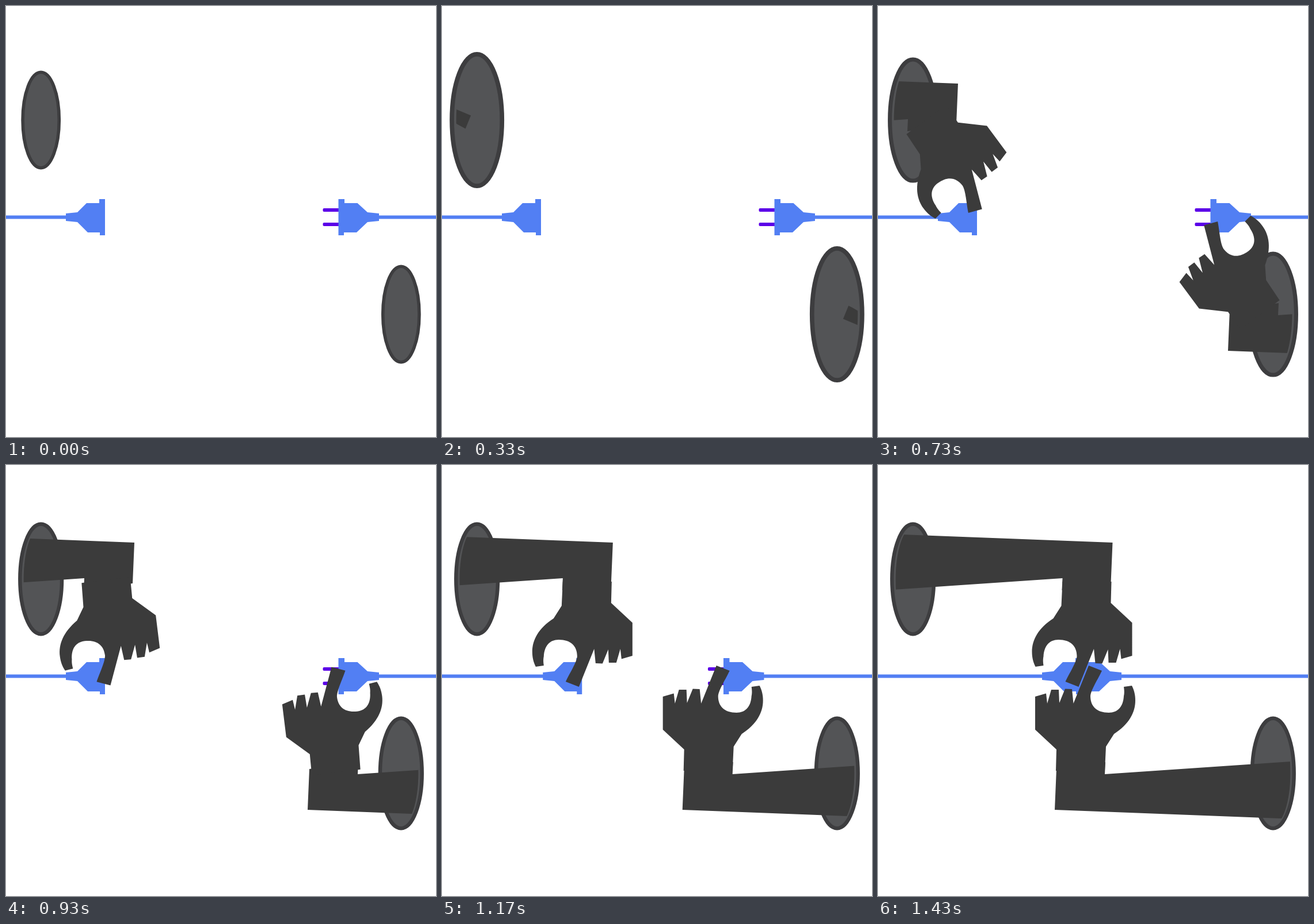
Write an HTML page with a canvas that moves like this. It is 747 by 750 pixels and loops after 2010 ms.

```html
<!DOCTYPE html>
<html lang="en">
<head>
<meta charset="utf-8">
<title>Plugging in</title>
<style>
html, body { margin: 0; width: 100%; height: 100%; overflow: hidden; background: #fff; }
canvas { display: block; }
</style>
</head>
<body>
<canvas id="stage" width="747" height="750"></canvas>
<script>
const ctx = document.getElementById('stage').getContext('2d');
const W = 747, H = 750, LOOP = 2010, TAU = Math.PI * 2;
const DARK = '#3b3b3b', RIM = '#3d3d3f', HOLE = '#535456', BLUE = '#527ff3', PRONG = '#5b00e8';
const CX = 60.7, CY = 198.5;

const socket = new Path2D('M-300 364.5H104V361L124 359 140 343H162V336H172V399H163V394H142L124 376 104 374V370.5H-300Z');
const plug = new Path2D('M1050 364.5H648V361L628 359 610.5 343H588V336H577.5V399H587V394H609L628 376 648 374V370.5H1050Z');
const hand = new Path2D(
  'M210 203L208 245 194 267C168 284 157 304 157 325C157 335 159 343 163 351' +
  'L177 349C176 342 176 338 177 333C178 315 187 304 203 304C224 304 235 315 235 333' +
  'C234 344 222 362 215 377L238 386 264.5 320 267 345 279 345.5 289 321 290 344 303 344' +
  ' 310 320 312 337.5 331 332V274.5L294 240 295 203Z');
const arm = new Path2D('M0 0L-3 71-88 83-87 62-600 97-600-23Z');

// step, wrist x, wrist y, wrist angle, elbow x
const reach = [
  [4, -210, 170, -97, -200],
  [10, -114.3, 187.7, -89, -92],
  [16, -19.1, 208, -69, 18],
  [22, 82.9, 221.2, -36.5, 139],
  [28, 161.4, 220.2, -7, 223],
  [30, 166, 221.5, 0, 225]
];

const unit = (n, a, b) => Math.min(1, Math.max(0, (n - a) / (b - a)));
const wave = u => (1 - Math.cos(Math.PI * u)) / 2;
const smooth = u => u * u * (3 - 2 * u);

function slope(i, c) {
  const a = reach[i - 1], b = reach[i + 1];
  return a && b ? (b[c] - a[c]) / (b[0] - a[0]) : 0;
}

// cubic through the reach table, column c
function pose(n, c) {
  const last = reach.length - 1;
  if (n <= reach[0][0]) return reach[0][c];
  if (n >= reach[last][0]) return reach[last][c];
  const i = reach.findIndex(r => r[0] > n) - 1;
  const a = reach[i], b = reach[i + 1], d = b[0] - a[0], u = (n - a[0]) / d;
  return a[c] + (b[c] - a[c]) * smooth(u) +
    d * u * (1 - u) * ((slope(i, c) - (b[c] - a[c]) / d) * (1 - u) -
      (slope(i + 1, c) - (b[c] - a[c]) / d) * u) +
    (b[c] - a[c]) * u * (1 - u) * (1 - 2 * u);
}

function fillAt(path, color, x, y = 0) {
  ctx.save();
  ctx.translate(x, y);
  ctx.fillStyle = color;
  ctx.fill(path);
  ctx.restore();
}

function drawHole(ry) {
  const line = ry * 0.065;
  ctx.beginPath();
  ctx.ellipse(CX, CY, ry * 0.4 - line / 2, ry - line / 2, 0, 0, TAU);
  ctx.fillStyle = HOLE;
  ctx.fill();
  ctx.lineWidth = line;
  ctx.strokeStyle = RIM;
  ctx.stroke();
}

// hides whatever is still behind the left wall of the hole
function clipHole(ry) {
  const rx = ry * 0.4 * 0.76, q = Math.PI / 2;
  ctx.beginPath();
  ctx.moveTo(CX, -50);
  ctx.ellipse(CX, CY, rx, ry * 0.91, 0, -q, -2 * q, true);
  ctx.ellipse(CX, CY, rx, ry * 1.21, 0, 2 * q, q, true);
  ctx.lineTo(CX, 900);
  ctx.lineTo(900, 900);
  ctx.lineTo(900, -50);
  ctx.closePath();
  ctx.clip();
}

function drawArm(n, ry, shift) {
  ctx.save();
  drawHole(ry);
  clipHole(ry);
  fillAt(arm, DARK, pose(n, 4) + shift, 135);
  ctx.translate(pose(n, 1) + shift, pose(n, 2));
  ctx.rotate(pose(n, 3) * Math.PI / 180);
  fillAt(hand, DARK, -238, -221.5);
  ctx.restore();
}

function drawProngs(x) {
  ctx.fillStyle = PRONG;
  for (const y of [352, 377]) {
    ctx.beginPath();
    ctx.roundRect(550.5 + x, y, 30, 6, 2);
    ctx.fill();
  }
}

function draw(t) {
  const n = Math.floor(t * 0.03 + 0.1001);   // thirty steps a second
  const ry = 86 + 40.5 * wave(unit(n, 4, 12.5)) - 27.5 * wave(unit(n, 13.5, 28));
  const pull = smooth(unit(n, 29, 43));
  const lead = 32.5 * smooth(unit(n, 28, 35));   // the right hand reaches further

  ctx.fillStyle = '#fff';
  ctx.fillRect(0, 0, W, H);
  drawProngs(-225 * pull);
  fillAt(plug, BLUE, -225 * pull);
  fillAt(socket, BLUE, 181 * pull);

  drawArm(n, ry, 182.5 * pull);
  ctx.save();
  ctx.translate(W, 735);
  ctx.rotate(Math.PI);
  drawArm(n, ry, 182.5 * pull + lead);
  ctx.restore();
}

const start = performance.now();
function tick() {
  draw((performance.now() - start) % LOOP);
  requestAnimationFrame(tick);
}
tick();
</script>
</body>
</html>
```
